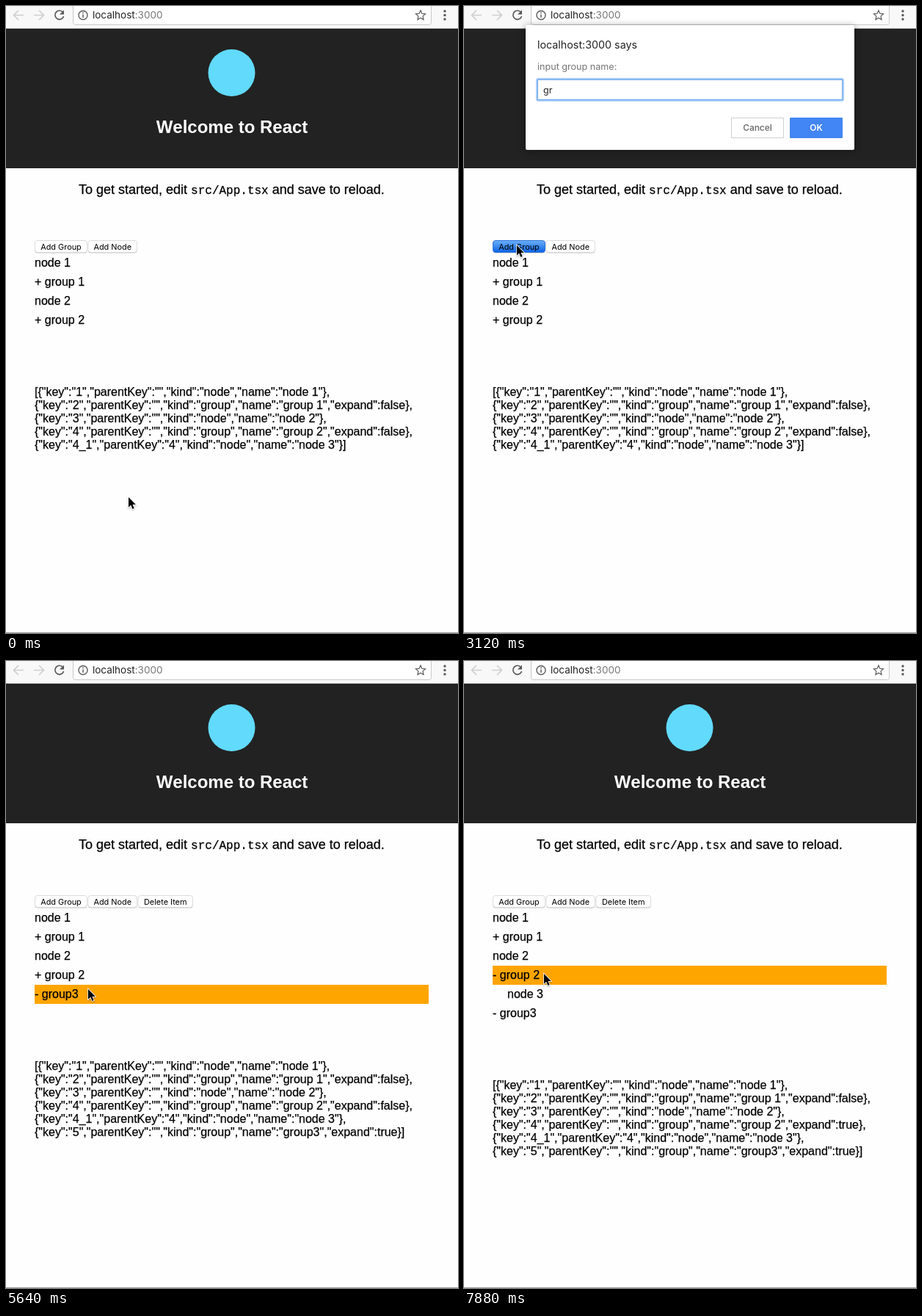
An HTML page for the animation above (8 s loop, 616 px wide and 854 px high).

```html
<!DOCTYPE html>
<html lang="en">
<head>
<meta charset="utf-8">
<style>
  html, body { margin: 0; width: 100%; height: 100%; overflow: hidden; background: #fefefe; }
  svg { position: absolute; left: 0; top: 0; overflow: visible; }
  text { white-space: pre; }
  .page { font: 16px "Liberation Sans", Arial, sans-serif; }
  .plain { font-kerning: none; }
  .inked { stroke: #000; stroke-width: .25px; }
  .ui { font-family: Inter, sans-serif; }
  #dialog {
    position: absolute; left: 84px; top: 26px; width: 448px; height: 170px;
    background: #fff; border-radius: 2px; box-shadow: 0 1px 10px rgba(0, 0, 0, .4);
    transform-origin: 50% 100%;
  }
</style>
</head>
<body>
<svg class="page" width="616" height="854">
  <rect width="616" height="30" fill="#f8f8f8"/>
  <rect y="30" width="616" height="1" fill="#b8b8b8"/>
  <rect x="91.5" y="-6" width="488" height="31.5" rx="3" fill="#fff" stroke="#c9c9c9"/>
  <g fill="none" stroke="#cfcfcf" stroke-width="1.7">
    <path d="M24 12.5H11M17 6l-6.5 6.5L17 19M38 12.5h13M45 6l6.5 6.5L45 19"/>
    <g stroke="#5a5a5a">
      <path d="M77.6 8.6A6 6 0 1 0 78.6 14"/>
      <circle cx="105" cy="12.5" r="6" stroke-width="1.4"/>
      <path d="M105 11.5v4.3M105 8.6v1.6" stroke-width="1.5"/>
      <path d="M565 6l1.9 4.3 4.6.5-3.4 3.1.9 4.6-4-2.3-4 2.3.9-4.6-3.4-3.1 4.6-.5z" stroke-width="1.2"/>
    </g>
  </g>
  <path d="M79 5.5v6h-6z" fill="#5a5a5a"/>
  <g fill="#5a5a5a"><circle cx="598" cy="7" r="1.7"/><circle cx="598" cy="12.5" r="1.7"/><circle cx="598" cy="18" r="1.7"/></g>
  <text class="ui" x="118" y="17.3" font-size="13.5" fill="#222">localhost<tspan fill="#777">:3000</tspan></text>

  <rect y="31" width="616" height="190" fill="#222"/>
  <circle cx="307.5" cy="91" r="32" fill="#61dafb"/>
  <text class="plain" x="308" y="173" font-size="24" font-weight="bold" fill="#fff" text-anchor="middle">Welcome to React</text>
  <text class="inked" x="99" y="256" font-size="18">To get started, edit <tspan font-family="Liberation Mono, monospace" font-size="16">src/App.tsx</tspan> and save to reload.</text>

  <g id="buttons"></g>
  <g id="tree" class="plain"></g>
  <rect y="853" width="616" height="1" fill="#a0a0a0"/>
  <linearGradient id="pressed" x2="0" y2="1"><stop stop-color="#6cb0fa"/><stop offset="1" stop-color="#0a62e4"/></linearGradient>
</svg>

<div id="dialog">
  <svg class="ui" width="448" height="170">
    <text x="16" y="32" font-size="14.3" fill="#222">localhost:3000 says</text>
    <text x="16" y="61" font-size="12.6" fill="#757575">input group name:</text>
    <rect id="ring" x="15.5" y="73.5" width="417" height="29" rx="2" fill="none" stroke="#a5cbf8" stroke-width="3"/>
    <rect id="field" x="16.5" y="74.5" width="415" height="27" fill="#fff"/>
    <text id="typed" x="24" y="92.5" font-size="12.5" fill="#222"></text>
    <rect x="280.5" y="126.5" width="71" height="27" fill="#fff" stroke="#d0d0d0"/>
    <rect x="360" y="126" width="72" height="28" rx="1" fill="#4285f4"/>
    <g font-size="11.8" font-weight="600" text-anchor="middle">
      <text x="316" y="144.3" fill="#757575">Cancel</text>
      <text x="396" y="144.3" fill="#fff">OK</text>
    </g>
  </svg>
</div>

<svg width="616" height="854">
  <path id="cursor" d="M0 0V13.8L3.2 10.8L5.4 16L7.6 15L5.5 10H9.8Z" stroke="#fff" paint-order="stroke" stroke-width="1.6"
    style="filter: drop-shadow(0 1px 1px rgba(0,0,0,.3))"/>
</svg>

<script>
const LOOP = 8000, STEP = 148.5;          // the screen is sampled in equal steps
const OPEN = 11, CLOSE = 28, PICK_GROUP3 = 38, PICK_GROUP2 = 51;
const $ = id => document.getElementById(id);

// [first step, last step, x, y]
const moves = [[0, 0, 167, 669], [2, 8, 72, 326], [29, 33, 112, 447], [39, 42, 109, 426]];
const typing = [[16, "g"], [18, "gr"], [22, "gro"], [24, "group"], [27, "group3"]];

function cursorAt(n) {
  let [, , x, y] = moves[0];
  for (const [from, to, tx, ty] of moves.slice(1)) {
    const u = Math.min(1, Math.max(0, (n - from) / (to - from)));
    const ease = u * u * (3 - 2 * u);
    x += (tx - x) * ease;
    y += (ty - y) * ease;
  }
  return [x, y];
}

function button(x, width, label, pressed) {
  return `<rect x="${x + .5}" y="320" width="${width - 1}" height="16.5" rx="3.5" fill="#bbb"/>
    <rect x="${x + .5}" y="319.5" width="${width - 1}" height="16" rx="3.5"
      fill="${pressed ? "url(#pressed)" : "#fff"}" stroke="${pressed ? "#2a70d8" : "#dcdcdc"}"/>
    <text class="ui" x="${x + width / 2}" y="332" font-size="10.9" text-anchor="middle">${label}</text>`;
}

function itemsAt(n) {
  const node = (key, name, parentKey = "") => ({ key, parentKey, kind: "node", name });
  const group = (key, name, expand) => ({ key, parentKey: "", kind: "group", name, expand });
  const items = [
    node("1", "node 1"), group("2", "group 1", false), node("3", "node 2"),
    group("4", "group 2", n >= PICK_GROUP2), node("4_1", "node 3", "4")
  ];
  if (n >= CLOSE) items.push(group("5", "group3", n >= PICK_GROUP3));
  return items;
}

function drawTree(n) {
  const items = itemsAt(n);
  const selected = n >= PICK_GROUP2 ? "4" : n >= PICK_GROUP3 ? "5" : "";
  const rows = items.filter(i => !i.parentKey || items.find(p => p.key === i.parentKey).expand);
  const label = (x, y, text) => `<text class="inked" x="${x}" y="${y}">${text}</text>`;
  const list = rows.map((item, i) => {
    const top = 337 + i * 26;
    const mark = item.kind === "node" ? "" : item.expand ? "- " : "+ ";
    const bar = item.key === selected ? `<rect x="39" y="${top}" width="537" height="26" fill="#ffa500"/>` : "";
    return bar + label(item.parentKey ? 59 : 39, top + 18, mark + item.name);
  });
  const json = items.map((item, i) => {
    const line = (i ? "" : "[") + JSON.stringify(item) + (i < items.length - 1 ? "," : "]");
    return label(39, 427 + rows.length * 26 + i * 18, line);
  });
  $("tree").innerHTML = list.concat(json).join("");
}

function drawDialog(n) {
  const tilt = n === CLOSE ? 1 : 0;
  const opacity = n < OPEN || n > CLOSE ? 0 : tilt ? .38 : Math.min(1, .5 + (n - OPEN) * .42);
  const style = $("dialog").style;
  style.opacity = opacity;
  // leans back around its lower edge while it leaves
  style.transform = tilt ? "matrix3d(1,0,0,0, 0,1.056,0,-.000314, 0,0,1,0, 0,-13,0,1)" : "none";
  $("ring").style.opacity = 1 - tilt;
  $("field").setAttribute("stroke", tilt ? "#aaa" : "#6ea6ee");
  $("typed").textContent = typing.reduce((text, [at, value]) => n >= at ? value : text, "");
}

function draw(n) {
  $("buttons").innerHTML = button(39, 72, "Add Group", n >= OPEN && n < CLOSE) + button(111.5, 67.5, "Add Node")
    + (n >= PICK_GROUP3 ? button(179.5, 75.5, "Delete Item") : "");
  drawTree(n);
  drawDialog(n);
  $("cursor").setAttribute("transform", `translate(${cursorAt(n)})`);
}

let shown = -1;
function tick() {
  const n = Math.floor((performance.now() % LOOP + 12) / STEP);
  if (n !== shown) draw(shown = n);
  requestAnimationFrame(tick);
}
tick();
</script>
</body>
</html>
```
